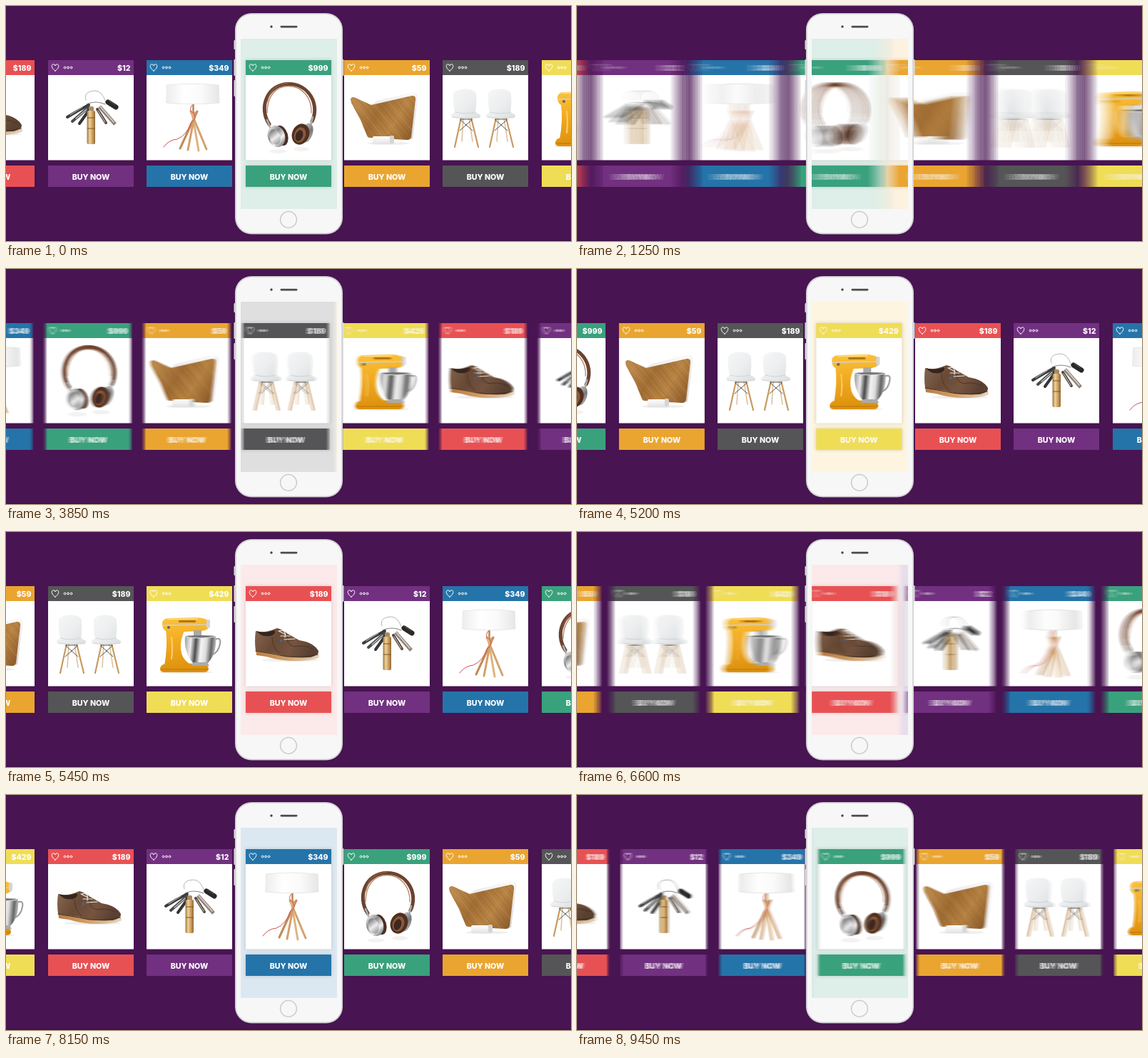
These frames come from a looping animation (792x330 px, 9.5 s). An HTML page with a canvas:

```html
<!DOCTYPE html>
<html lang="en">
<head>
<meta charset="utf-8">
<title>Shop carousel</title>
<style>
html, body { margin: 0; width: 100%; height: 100%; overflow: hidden; background: #481451; }
canvas { display: block; }
</style>
</head>
<body>
<canvas id="stage" width="792" height="330"></canvas>
<script>
const W = 792, H = 330, LOOP = 9500, TICK = 50;
const PITCH = 138.43, CARD_X = 336, CARD_Y = 76, CARD_W = 120;
const SCREEN = { x: 329, y: 46, w: 135, h: 239 };
const STARTS = [1160, 2495, 3809, 5195, 6540, 7909, 9259];
const SLIDE = 231, SHUTTER = 26, SAMPLES = 16;

let g; // context the drawing helpers paint on

function layer(w, h, paint) {
  const canvas = document.createElement('canvas');
  canvas.width = w;
  canvas.height = h;
  const previous = g;
  g = canvas.getContext('2d');
  if (paint) paint();
  g = previous;
  return canvas;
}

function fill(d, color) {
  g.fillStyle = color;
  g.fill(new Path2D(d));
}

function line(d, color, width, cap = 'round') {
  g.strokeStyle = color;
  g.lineWidth = width;
  g.lineCap = cap;
  g.lineJoin = 'round';
  g.stroke(new Path2D(d));
}

function oval(x, y, rx, ry, color, turn = 0) {
  g.beginPath();
  g.ellipse(x, y, rx, ry, turn, 0, 7);
  g.fillStyle = color;
  g.fill();
}

function ring(x, y, r, color, width) {
  g.beginPath();
  g.arc(x, y, r, 0, 7);
  g.strokeStyle = color;
  g.lineWidth = width;
  g.stroke();
}

function box(x, y, w, h, color, r = 0) {
  g.beginPath();
  g.roundRect(x, y, w, h, r);
  g.fillStyle = color;
  g.fill();
}

function blend(x0, y0, x1, y1, ...colors) {
  const gradient = g.createLinearGradient(x0, y0, x1, y1);
  colors.forEach((c, i) => gradient.addColorStop(i / (colors.length - 1), c));
  return gradient;
}

// Products: x is relative to the card, y to the stage.

function headphones() {
  oval(45, 204, 12, 3, '#f3f3f3');
  oval(78, 201, 11, 3, '#f4f2f1');
  line('M33 166C17 142 31 109.5 60 109.5C90 109.5 104 140 93 162', '#6b4330', 5);
  line('M30 150C30 128 41 112.5 60 112.5C80 112.5 93 130 92 150', '#b98a68', 1.4);
  line('M30 134C34 118 44 109 60 108.5', '#8d5c42', 1.5);
  line('M30 160L35 172M94 156L91 168', '#aaa', 2.6);
  oval(50, 182, 9, 14.5, '#4b2e23', -.3);
  oval(43, 183, 12, 15.5, blend(31, 172, 55, 196, '#e8e8e8', '#8a8a8a', '#f2f2f2', '#5a5a5a'), -.3);
  oval(41, 184, 7.5, 11, blend(34, 176, 48, 194, '#777', '#ededed', '#8d8d8d'), -.3);
  oval(86, 178, 8, 14, blend(78, 166, 94, 190, '#d2d2d2', '#777', '#bbb'), .3);
  oval(77, 180, 12, 15, '#50301f', .35);
  oval(76, 181, 8, 11, '#8a593e', .35);
  oval(75, 182, 5, 8, '#3c2820', .35);
}

function board() {
  oval(62, 193, 30, 2, '#eee');
  fill('M37 139L46 133L95 121.5Q104 120 103.5 128L96 186L90 188Z', blend(40, 130, 104, 180, '#e9e9e9', '#fafafa', '#d2d2d2'));
  const wood = 'M9 131Q10 127 15 128.5L38 139L95 126Q101 125 100 132L94 184Q93 188 88 188L36 185Q33 185 32 182L23 160L10 136Z';
  fill(wood, blend(20, 140, 90, 185, '#b9874a', '#a06d35', '#b98545', '#91602e'));
  g.save();
  g.clip(new Path2D(wood));
  for (let i = 0; i < 20; i++) {
    line(`M${i * 8 - 42} 125Q${i * 8 - 20} 150 ${i * 8 + 12} 191`, i % 3 ? '#87562266' : '#d0a06577', 1);
  }
  g.restore();
  box(40, 183, 30, 11, blend(40, 183, 40, 194, '#fff', '#e2e2e2'), 2);
  box(64, 182, 6, 11, '#d5d5d5', 2);
}

function chair() {
  line('M26 157L17 198M40 157L50 198', '#c99a62', 2.2);
  line('M29 157L27 190M37 157L42 190', '#dfc19b', 1.6);
  line('M25 160L42 175M41 160L24 175M25 159L41 159', '#444', .9);
  fill('M15 124Q16 117 31 116.5Q46 117 47 124Q48 138 46 149L53 153Q54 157.5 46 157.5L20 157.5Q11 157.5 12 153L17 149Q14 138 15 124Z',
    blend(12, 118, 54, 158, '#f6f7f7', '#eceeef', '#dbdfe1'));
  line('M18 149Q31 153 46 149M14 156Q32 159 52 156', '#d1d5d8', 1);
}

function chairs() {
  chair();
  g.save();
  g.translate(49, 0);
  chair();
  g.restore();
}

function mixer() {
  const yellow = blend(25, 120, 32, 195, '#fbc33f', '#f1a91e', '#dd920f');
  oval(55, 197, 38, 2, '#eee');
  fill('M27 137L53 139Q47 152 48 164Q49 178 60 185L25 188Q30 160 27 137Z', yellow);
  fill('M19 191Q20 185 32 184L80 185Q87 187 87 192Q87 197 80 197L24 197Q18 196 19 191Z', yellow);
  line('M21 193L85 193', '#b87408', 1);
  fill('M22 129Q22 121 32 121L70 120Q88 121 89 129Q89 137 78 139L32 141Q22 139 22 129Z', yellow);
  line('M30 122.5L72 121.5', '#ffdf86', 1.5);
  line('M23 131L88 130', '#d6d1c4', 1.6);
  box(45, 124, 24, 3, '#b47712', 1);
  box(84, 123, 5, 12, '#d4d4d4', 2);
  box(66, 138, 11, 9, '#a9a9a9', 1);
  oval(31, 134, 2, 2, '#666');
  line('M96 151Q105 147 103 157Q101 168 93 172', '#9a9a9a', 2);
  fill('M54 147L97 147Q99 170 86 184L65 184Q52 168 54 147Z',
    blend(54, 160, 98, 164, '#aaa', '#eee', '#4c4c4c', '#f4f4f4', '#ddd', '#666', '#d9d9d9'));
  fill('M66 183L85 183L88 188L62 188Z', '#aaa');
  oval(75.5, 147, 21.5, 2, '#777');
  line('M54 147Q75 151 97 147', '#e9e9e9', 1);
  line('M35 148Q37 164 35 178', '#ffd06b', 2);
}

function shoe() {
  oval(62, 180, 40, 2, '#eee');
  fill('M14 164L15 173L29 175Q48 181 70 181Q94 181 103 176L102 170Z', blend(14, 170, 103, 178, '#b87b43', '#d3a269', '#e6d5bf'));
  fill('M14 139Q24 142 36 138L44 135Q50 136 59 143L75 152Q95 155 102 167Q103 173 91 176Q62 178 43 171L14 167Q12 153 14 139Z',
    blend(20, 138, 85, 178, '#80604a', '#694a36', '#755440', '#594031'));
  fill('M15 139Q27 143 40 138Q44 142 35 146Q22 148 15 139Z', '#35251e');
  line('M37 147Q37 162 47 170M59 145Q55 157 68 161Q82 158 94 164', '#4d3528', 1);
  line('M14 167L43 172Q70 179 101 172', '#463125', 1.2);
  line('M46 139L56 144M49 146L62 146M54 151L69 150M47 139Q57 136 55 148', '#ece7df', 1.2);
  box(48, 151, 3, 4, '#43698b', 1);
}

function keys() {
  line('M53 132Q50 123 59 120Q72 116 78 128L81 135', '#b5b5b5', 1);
  line('M54 138Q66 132 80 138', '#888', 1.2);
  line('M84 135L95 142', '#2a2928', 7);
  line('M85 133L94 139', '#555', 1);
  line('M57 139L42 147L27 156', '#3b3b3c', 4);
  line('M48 142L31 153', '#a5a5a5', 1.2);
  line('M57 142L34 162', '#4a4a4a', 4);
  line('M54 145L39 158', '#c7c7c7', 1.3);
  line('M59 144L44 165', '#353535', 4);
  line('M72 141L94 166', '#8f8278', 5, 'butt');
  line('M73 141L92 163', '#d8cec5', 1.8);
  line('M69 145L81 164', '#514840', 4);
  line('M70 147L80 163', '#b8aaa0', 1.4);
  const brass = blend(54, 0, 67, 0, '#916a32', '#efd299', '#c4975a', '#825b2b');
  box(57, 141, 7, 8, '#a98a60', 2);
  box(54.5, 147, 11.5, 47, brass, 2);
  line('M55 157L66 157M55 172L66 172', '#795528', 1, 'butt');
}

function lamp() {
  line('M65.5 138L65.5 155', '#b98b58', 2.6);
  line('M62 148L84 201', '#d2a26e', 3);
  line('M71 148L47 200', '#c18c58', 3);
  line('M64 150L73 203', '#dfb381', 3);
  line('M68 150L58 202', '#d3a06a', 3);
  line('M64 139Q58 146 66 151Q72 158 62 164Q57 181 43 187Q31 188 24 198', '#d64d50', 1);
  const shade = 'M29 111Q65 107.5 101 111L102 136Q65 139.5 28 136Z';
  fill(shade, blend(28, 0, 102, 0, '#ededed', '#fff', '#fafafa', '#e6e6e6'));
  line(shade, '#e2e2e2', .8);
}

const ITEMS = [
  { price: '$999', color: '#3aa17d', tint: '#deeee8', draw: headphones },
  { price: '$59', color: '#eaa530', tint: '#fdf1e0', draw: board },
  { price: '$189', color: '#555557', tint: '#dfdfdf', draw: chairs },
  { price: '$429', color: '#f0dd56', tint: '#fdf5df', draw: mixer },
  { price: '$189', color: '#e85153', tint: '#fceaea', draw: shoe },
  { price: '$12', color: '#723080', tint: '#e5deeb', draw: keys },
  { price: '$349', color: '#2574a9', tint: '#dce8f1', draw: lamp }
];

function label(text, x, y, size, align) {
  g.font = `800 ${size}px Inter, sans-serif`;
  g.textAlign = align;
  g.fillStyle = '#fff';
  g.fillText(text, x, y);
}

function paintCard(item) {
  g.translate(0, -CARD_Y);
  box(0, 76, CARD_W, 21, item.color);
  box(0, 97, CARD_W, 119.5, '#fff');
  box(0, 224, CARD_W, 30, item.color);
  line('M10 91.2C3.5 86.5 4.5 81.8 7.5 81.8Q9.5 81.8 10 84Q10.5 81.8 12.5 81.8C15.5 81.8 16.5 86.5 10 91.2Z', '#fff', 1);
  for (const x of [23.5, 28, 32.5]) ring(x, 86.5, 1.4, '#fff', 1);
  label(item.price, 115.5, 90.5, 10.6, 'right');
  label('BUY NOW', 60, 243.5, 10.7, 'center');
  item.draw();
}

function paintPanel(item) {
  box(0, 0, 139, SCREEN.h, item.tint);
  g.shadowColor = 'rgba(0,0,0,.16)';
  g.shadowBlur = 5;
  g.drawImage(item.card, 9, CARD_Y - SCREEN.y);
}

for (const item of ITEMS) {
  item.card = layer(CARD_W, 178, () => paintCard(item));
  item.panel = layer(139, SCREEN.h, () => paintPanel(item));
}

const phone = layer(W, H, () => {
  const side = '#dcdcde';
  box(319.5, 48, 3, 13, side, 1);
  box(319.5, 75, 3, 23, side, 1);
  box(319.5, 104, 3, 23, side, 1);
  box(470.5, 75, 3, 23, side, 1);
  box(321, 10, 151, 310.5, '#d2d2d5', 23);
  box(322.8, 11.8, 147.4, 306.9, '#f7f7f7', 21);
  g.clearRect(SCREEN.x, SCREEN.y, SCREEN.w, SCREEN.h);
  oval(372, 29, 1.7, 1.7, '#444');
  box(384.5, 27.8, 24, 2.6, '#4a4a4a', 1.3);
  ring(396, 300, 11.4, '#cbcbcd', 1.5);
});

function ease(u) {
  if (u <= 0) return 0;
  if (u >= 1) return 1;
  return u < .5 ? 4 * u ** 3 : 1 - 4 * (1 - u) ** 3;
}

const position = t => STARTS.reduce((sum, s) => sum + ease((t - s) / SLIDE), 0);

function paintStrip(pos) {
  box(0, 0, W, H, '#481451');
  box(0, 329, W, 1, '#361040');
  const first = Math.floor(pos) - 3;
  const slots = Array.from({ length: 8 }, (_, i) => ({
    item: ITEMS[(first + i + 7) % 7],
    x: Math.floor(CARD_X + (first + i - pos) * PITCH)
  }));
  for (const { item, x } of slots) g.drawImage(item.card, x, CARD_Y);
  g.save();
  g.beginPath();
  g.rect(SCREEN.x, SCREEN.y, SCREEN.w, SCREEN.h);
  g.clip();
  for (const { item, x } of slots) g.drawImage(item.panel, x - 9, SCREEN.y);
  g.restore();
}

const stage = document.getElementById('stage').getContext('2d');
const buffer = layer(W, H);
g = buffer.getContext('2d');

// Motion blur: the mean of several positions while the shutter is open.
function render(t) {
  const still = position(t - SHUTTER / 2) === position(t + SHUTTER / 2);
  const count = still ? 1 : SAMPLES;
  for (let i = 0; i < count; i++) {
    paintStrip(position(t + SHUTTER * ((i + .5) / count - .5)));
    stage.globalAlpha = 1 / (i + 1);
    stage.drawImage(buffer, 0, 0);
  }
  stage.globalAlpha = 1;
  stage.drawImage(phone, 0, 0);
}

let shown = -1;
const begin = performance.now();
function tick() {
  const t = Math.floor((performance.now() - begin) % LOOP / TICK) * TICK;
  if (t !== shown) render(shown = t);
  requestAnimationFrame(tick);
}
tick();
</script>
</body>
</html>
```
